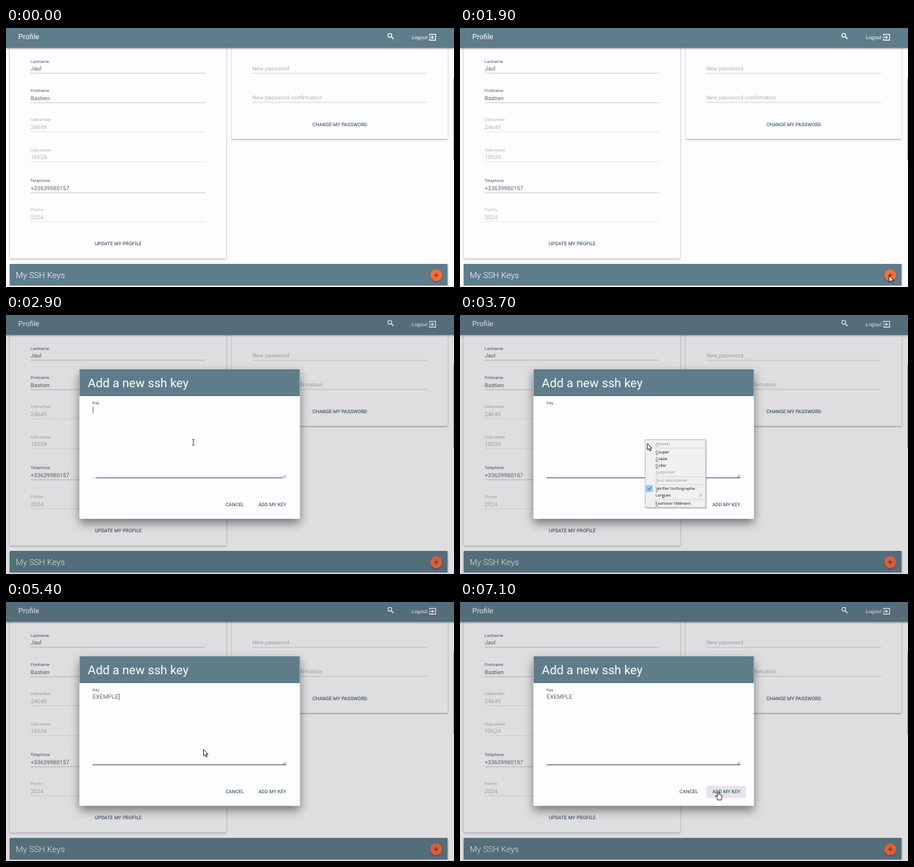
Recreate the animation shown at these times as an HTML page. Size 600x348 px, loop 7200 ms.

```html
<!DOCTYPE html>
<html lang="fr">
<head>
<meta charset="utf-8">
<title>Profile</title>
<style>
html, body { margin: 0; width: 100%; height: 100%; overflow: hidden; background: #fdfcff; }
svg { display: block; width: 600px; height: 348px; }
text { font-family: Roboto, sans-serif; text-rendering: geometricPrecision; white-space: pre; }
.menu text { font-family: "Open Sans", "Noto Sans", sans-serif; }
</style>
</head>
<body>
<svg id="stage" viewBox="0 0 600 348" xmlns="http://www.w3.org/2000/svg">
  <defs>
    <filter id="soft" x="-10%" y="-10%" width="120%" height="130%">
      <feDropShadow dx="0" dy="1" stdDeviation="1.1" flood-color="#000" flood-opacity=".36"/>
    </filter>
    <filter id="deep" x="-20%" y="-20%" width="140%" height="150%">
      <feDropShadow dx="0" dy="6" stdDeviation="6.5" flood-color="#000" flood-opacity=".48"/>
    </filter>
  </defs>
  <rect width="600" height="348" fill="#fdfcff"/>
  <g id="page"></g>
  <rect id="dim" width="600" height="348" fill="#000" opacity=".12"/>
  <g id="dialog"></g>
  <g id="menu" class="menu"></g>
  <g id="cursor">
    <path id="arrow" d="M0 0V8.6L2 6.9L3.4 10L4.9 9.3L3.5 6.3H6Z" fill="#fff" stroke="#111" stroke-width=".85" stroke-linejoin="round"/>
    <path id="beam" d="M-1.6 -3.8H-.5L0 -3.4L.5 -3.8H1.6M0 -3.4V3.4M-1.6 3.8H-.5L0 3.4L.5 3.8H1.6" fill="none" stroke="#222" stroke-width=".8"/>
    <path id="hand" d="M-1 .6Q0 -.6 1 .6V4L4.2 4.7Q5.4 5.1 5.2 6.6L4.3 9.6V11.4H-.8V10L-3.5 6.7Q-3.6 5.4 -2.3 5.7L-1 7Z" fill="#fff" stroke="#111" stroke-width=".85" stroke-linejoin="round"/>
  </g>
</svg>
<script>
const LOOP = 7200, STEP = 100;
const SLATE = '#5f7c8b', INK = '#4b6575', GREY = '#666', PALE = '#b4b3b6', BLUE = '#90c8f6';
const $ = id => document.getElementById(id);

function add(parent, tag, attrs, content) {
  const el = document.createElementNS('http://www.w3.org/2000/svg', tag);
  for (const k in attrs) el.setAttribute(k, attrs[k]);
  if (content) el.textContent = content;
  parent.appendChild(el);
  return el;
}
const rect = (p, x, y, width, height, fill, more) => add(p, 'rect', { x, y, width, height, fill, ...more });
const text = (p, x, y, size, fill, str, more) => add(p, 'text', { x, y, 'font-size': size, fill, ...more }, str);
const line = (p, x1, x2, y, stroke, more) => add(p, 'line', { x1, x2, y1: y, y2: y, stroke, 'stroke-width': .7, ...more });
const action = (p, x, y, str) => text(p, x, y, 6.55, INK, str, { 'font-weight': 500, 'text-anchor': 'middle' });
const show = (el, on) => el.setAttribute('visibility', on ? 'visible' : 'hidden');

function buildPage() {
  const p = $('page');
  rect(p, 5, -10, 290, 319.5, '#fdfcff', { rx: 1, filter: 'url(#soft)' });
  rect(p, 302.5, -10, 289, 159, '#fdfcff', { rx: 1, filter: 'url(#soft)' });

  const fields = [
    ['Lastname', 'Jaul', 46.5, 1], ['Firstname', 'Bastien', 86, 1],
    ['Uidnumber', '24649', 125, 0], ['Gidnumber', '10024', 165.5, 0],
    ['Telephone', '+33639980157', 207, 1], ['Promo', '2024', 246, 0]
  ];
  for (const [label, value, y, live] of fields) {
    text(p, 33, y, 5.6, live ? INK : PALE, label);
    text(p, 33, y + 10.6, 7.65, live ? GREY : PALE, value);
    line(p, 33, 267, y + 14.3, live ? '#b9b8bb' : '#c4c3c6', live ? {} : { 'stroke-dasharray': '.8 .8' });
  }
  action(p, 150.3, 292.3, 'UPDATE MY PROFILE');

  text(p, 330, 57, 7.5, PALE, 'New password');
  text(p, 330, 96.2, 7.5, PALE, 'New password confirmation');
  line(p, 330, 564, 61, '#c4c3c6');
  line(p, 330, 564, 100, '#c4c3c6');
  action(p, 447, 131.8, 'CHANGE MY PASSWORD');

  rect(p, 5, 317, 586.5, 45, '#fdfcff', { filter: 'url(#soft)' });
  rect(p, 5, 317, 586.5, 29.3, SLATE, { rx: 1 });
  text(p, 13, 336, 11.3, '#fff', 'My SSH Keys', { 'font-weight': 300 });
  add(p, 'circle', { cx: 576.2, cy: 332.2, r: 7.9, fill: '#ff6a3c', filter: 'url(#soft)' });
  add(p, 'circle', { id: 'ripple', cx: 576.2, cy: 332.2, r: 7, fill: '#9c3418' });
  add(p, 'path', { d: 'M573 332.2H579.4M576.2 329V335.4', stroke: '#3d4347', 'stroke-width': 1 });

  rect(p, 0, -5, 600, 31.8, SLATE, { filter: 'url(#soft)' });
  text(p, 16.5, 15.3, 9.8, '#fff', 'Profile');
  text(p, 543.3, 14.6, 6.8, '#fff', 'Logout');
  const icon = { fill: 'none', stroke: '#fff', 'stroke-width': 1.1 };
  add(p, 'circle', { cx: 514, cy: 9.8, r: 2.6, ...icon });
  add(p, 'path', { d: 'M516 11.8L519 14.8', ...icon, 'stroke-width': 1.4 });
  add(p, 'path', { d: 'M567.3 10.6V8.5H575.3V16.4H567.3V14.3M566.8 12.45H572M570.2 10.3L572.4 12.45L570.2 14.6', ...icon });
  rect(p, 599, 67, 1, 111, '#b4b3b6');
}

function buildDialog() {
  const p = $('dialog');
  rect(p, 98.5, 73, 295, 200.7, '#fdfcff', { rx: 1, filter: 'url(#deep)' });
  rect(p, 98.5, 73, 295, 36, SLATE);
  text(p, 109.6, 96.6, 16.4, '#fff', 'Add a new ssh key');
  text(p, 116, 130, 7.5, PALE, 'Key', { id: 'label' });
  text(p, 116, 130, 7.9, GREY, 'EXEMPLE', { id: 'value' });
  rect(p, 116, 123, .8, 9, '#666', { id: 'caret' });
  add(p, 'path', { d: 'M374.6 213.4V218H370Z', fill: '#c2c1c4' });
  line(p, 116, 375.5, 219, '#cfced1');
  line(p, 116, 375.5, 218.8, INK, { id: 'focus', 'stroke-width': 1.1 });
  rect(p, 330, 247, 53, 16.3, '#e6e5e8', { id: 'hover', rx: 1 });
  action(p, 306.5, 257.2, 'CANCEL');
  action(p, 356.8, 257.2, 'ADD MY KEY');
}

function buildMenu() {
  const p = $('menu');
  rect(p, 249.5, 169.5, 81, 91, '#000', { opacity: .18 });
  rect(p, 248, 167.7, 81, 91, '#f0eff1', { stroke: '#aaa9ac', 'stroke-width': .7 });
  rect(p, 249, 0, 79, 9.3, BLUE, { id: 'pick' });
  rect(p, 249, 228.7, 9, 9, BLUE);
  add(p, 'path', { d: 'M251.6 233.2L253 234.7L255.6 231.5', fill: 'none', stroke: '#333', 'stroke-width': .8 });
  add(p, 'path', { d: 'M321.6 240.6L323.1 242.2L321.6 243.8', fill: 'none', stroke: '#444', 'stroke-width': .7 });
  for (const y of [179, 217.3, 228, 248.2]) line(p, 260, 327, y, '#cfced1');
  const items = [
    ['Annuler', 175.3, 0, 0], ['Couper', 186.1, 1, 0], ['Copier', 195.2, 1, 0],
    ['Coller', 204.3, 1, 0], ['Supprimer', 213.3, 0, 0], ['Tout sélectionner', 224.4, 0, 0],
    ["Vérifier l'orthographe", 235.2, 1, 0], ['Langues', 244.2, 1, 3], ["Examiner l'élément", 255, 1, 0]
  ];
  for (const [str, y, live, key] of items) {
    const el = text(p, 262, y, 5.3, live ? '#1c1c1c' : '#929194', '');
    add(el, 'tspan', {}, str.slice(0, key));
    add(el, 'tspan', { 'text-decoration': 'underline' }, str[key]);
    add(el, 'tspan', {}, str.slice(key + 1));
  }
}

// Pointer stops: time, x, y
const stops = [
  [400, 582, 352], [1200, 577, 338], [1400, 577, 338], [1800, 574.7, 332.6],
  [2100, 574.7, 332.6], [2700, 251, 171], [3200, 251, 171], [3300, 248.5, 168],
  [3600, 248.5, 168], [4000, 264.6, 198.2], [5500, 264.6, 198.2], [6300, 345.8, 254.6], [7200, 345.8, 254.6]
];
const ramp = (t, a, b) => Math.min(1, Math.max(0, (t - a) / (b - a)));
const ease = u => u * u * (3 - 2 * u);
const within = (t, ...spans) => spans.some(([a, b]) => t >= a && t < b);

function pointer(t) {
  let i = 0;
  while (i < stops.length - 2 && t >= stops[i + 1][0]) i++;
  const [t0, x0, y0] = stops[i], [t1, x1, y1] = stops[i + 1];
  const u = ease(ramp(t, t0, t1));
  return [x0 + (x1 - x0) * u, y0 + (y1 - y0) * u];
}

function draw(t) {
  const [x, y] = pointer(t);
  const open = t >= 2000, menuOpen = within(t, [3300, 4300]);
  show($('dim'), open);
  show($('dialog'), open);
  $('ripple').setAttribute('opacity', within(t, [2000, 2300]) ? .6 * (1 - ramp(t, 2000, 2300)) : 0);

  const up = ramp(t, 2700, 2900), label = $('label');
  label.setAttribute('y', 130 - 9.8 * up);
  label.setAttribute('font-size', 7.5 - 1.9 * up);
  label.setAttribute('fill', up > .4 ? INK : PALE);
  const half = 129.75 * (1 - (1 - ramp(t, 2700, 3000)) ** 3);
  $('focus').setAttribute('x1', 245.75 - half);
  $('focus').setAttribute('x2', 245.75 + half);

  const filled = t >= 4300;
  $('value').setAttribute('opacity', filled ? 1 : 0);
  const blink = within(t, [2800, 3300], [3800, 4900], [5400, 6000], [6500, 7000]);
  $('caret').setAttribute('opacity', blink ? 1 : 0);
  $('caret').setAttribute('x', filled ? 151.2 : 116);

  const onAdd = t > 5500 && x > 330 && y > 247;
  $('hover').setAttribute('opacity', onAdd ? ramp(t, 5900, 6300) : 0);

  show($('menu'), menuOpen);
  const row = Math.floor((y + 1 - 179.3) / 9.1);
  $('pick').setAttribute('y', 179.3 + 9.1 * row);
  $('pick').setAttribute('opacity', row >= 0 ? 1 : 0);

  const inField = open && x > 116 && x < 376 && y > 116 && y < 219;
  const kind = onAdd ? 'hand' : inField && (t < 3300 || t >= 5600) ? 'beam' : 'arrow';
  for (const id of ['arrow', 'beam', 'hand'])
    $(id).setAttribute('opacity', id === kind && t >= 500 ? 1 : 0);
  $('cursor').setAttribute('transform', `translate(${x.toFixed(2)} ${y.toFixed(2)})`);
}

buildPage();
buildDialog();
buildMenu();
const start = performance.now();
function tick() {
  const t = (performance.now() - start) % LOOP;
  draw(Math.floor(t / STEP) * STEP);
  requestAnimationFrame(tick);
}
tick();
</script>
</body>
</html>
```
